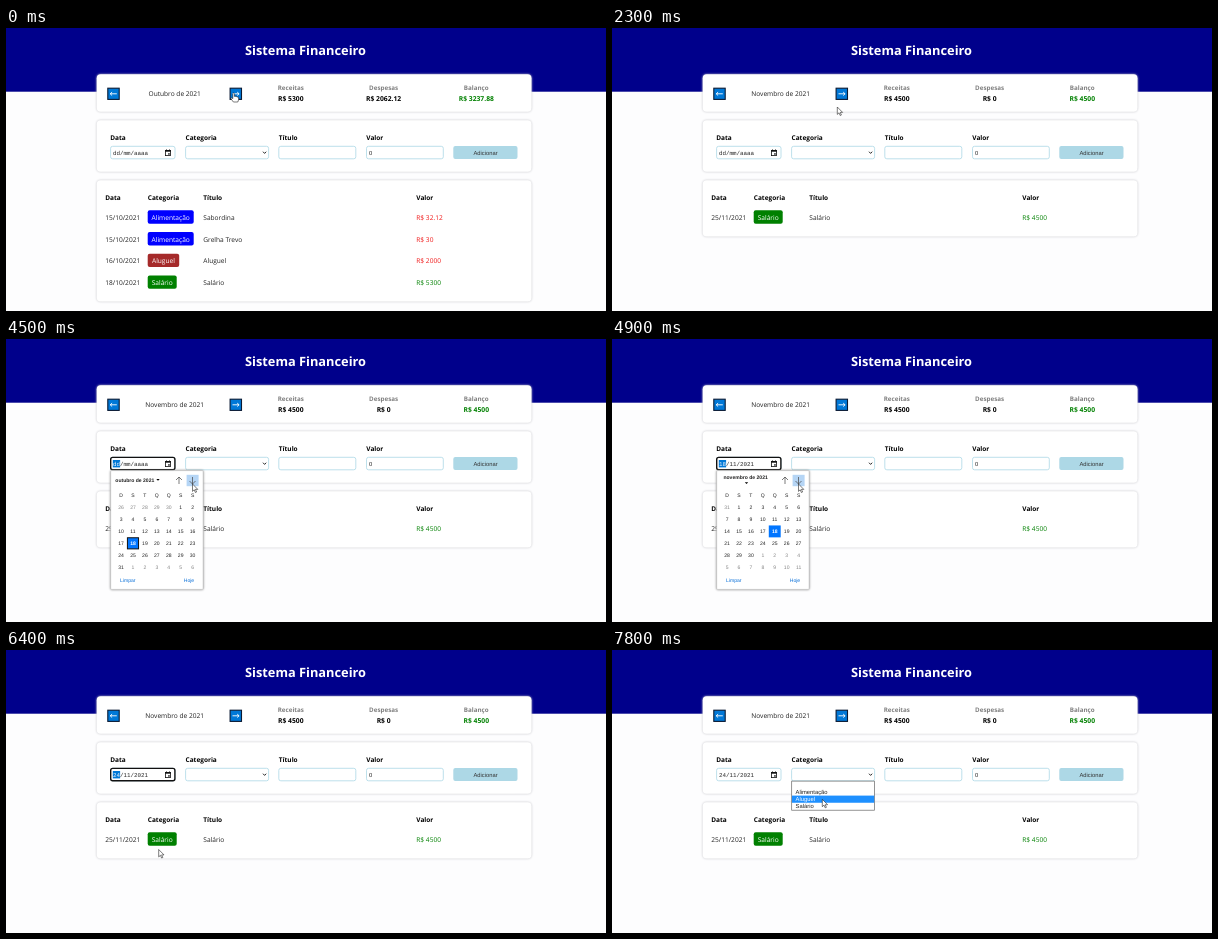
Write an HTML page that moves like this. It is 600 by 283 pixels and loops after 8000 ms.

```html
<!DOCTYPE html>
<html lang="pt-BR">
<head>
<meta charset="utf-8">
<title>Sistema Financeiro</title>
<style>
html, body { margin: 0; width: 100%; height: 100%; overflow: hidden; background: #fdfdfe; }
svg { display: block; width: 100vw; height: 100vh; }
text { font-family: "Open Sans", "Noto Sans", sans-serif; font-size: 6.6px; fill: #222; text-rendering: geometricPrecision; white-space: pre; }
.b { font-weight: 700; font-size: 6.5px; fill: #000; }
.h1 { font-weight: 700; font-size: 12.8px; fill: #fff; }
.label { font-weight: 700; font-size: 6.25px; fill: #808080; }
.sum { font-weight: 700; font-size: 6.75px; fill: #000; }
.ui { font-family: "Liberation Sans", Arial, sans-serif; font-size: 5.8px; }
.mono { font-family: "Liberation Mono", monospace; font-size: 5.85px; }
.cal { font-family: "Liberation Sans", Arial, sans-serif; font-size: 5.05px; }
.m { text-anchor: middle; }
.card { fill: #fff; filter: drop-shadow(0 0 1.1px #c4c4c8); }
.pop { fill: #fff; stroke: #b5b5b5; stroke-width: .5; filter: drop-shadow(.4px .8px 1.2px #888); }
</style>
</head>
<body>
<svg id="stage" viewBox="0 0 600 283" preserveAspectRatio="none"></svg>
<script>
const LOOP = 8000, STEP = 100;
const NEXT_MONTH = 1200, OPEN_CAL = 3000, CAL_NEXT = 4700, PICK_DAY = 6300, OPEN_SELECT = 7100;
const BLUE = '#0078d7', HOVER = '#b5d5f5';

// pointer stops: time, x, y
const PATH = [
  [1800, 227.6, 65], [2100, 227, 70], [2300, 225.3, 79], [2500, 203, 95], [2700, 166, 113.5],
  [2900, 162.8, 122], [3300, 162.8, 122], [3600, 158, 132], [3900, 147, 194], [4100, 155, 190],
  [4500, 186.5, 145], [5000, 186.5, 145], [5400, 179.9, 176.5], [5900, 152.7, 199.5],
  [6400, 152.7, 199.5], [7100, 258, 128], [7300, 258, 128], [7800, 210.3, 149.3]
];

const OCTOBER = {
  title: 'Outubro de 2021', sums: ['5300', '2062.12', '3237.88'],
  rows: [
    ['15/10/2021', 'Alimentação', 'Sabordina', '32.12'],
    ['15/10/2021', 'Alimentação', 'Grelha Trevo', '30'],
    ['16/10/2021', 'Aluguel', 'Aluguel', '2000'],
    ['18/10/2021', 'Salário', 'Salário', '5300']
  ]
};
const NOVEMBER = {
  title: 'Novembro de 2021', sums: ['4500', '0', '4500'],
  rows: [['25/11/2021', 'Salário', 'Salário', '4500']]
};
const TAGS = { 'Alimentação': ['#0000ff', 46], 'Aluguel': ['#a52a2a', 31.5], 'Salário': ['#008000', 29] };

const rect = (x, y, w, h, fill, more = '') =>
  `<rect x="${x}" y="${y}" width="${w}" height="${h}" fill="${fill}" ${more}/>`;
const text = (x, y, s, cls = '', fill = '') =>
  `<text x="${x}" y="${y}" class="${cls}"${fill && ` style="fill:${fill}"`}>${s}</text>`;
const line = (d, color, w) => `<path d="${d}" fill="none" stroke="${color}" stroke-width="${w}"/>`;
const card = (y, h) => `<rect class="card" x="90.7" y="${y}" width="434.8" height="${h}" rx="4"/>`;
const field = (x, w) => rect(x, 118.3, w, 12.5, '#fff', 'rx="2" stroke="#add8e6" stroke-width=".8"');
const inside = (p, x, y, w, h) => p.x >= x && p.x < x + w && p.y >= y && p.y < y + h;

function pointerAt(t) {
  const i = PATH.findIndex(p => p[0] > t);
  if (i === 0) return { x: PATH[0][1], y: PATH[0][2] };
  if (i < 0) return { x: PATH.at(-1)[1], y: PATH.at(-1)[2] };
  const [a, b] = [PATH[i - 1], PATH[i]], k = (t - a[0]) / (b[0] - a[0]);
  return { x: a[1] + (b[1] - a[1]) * k, y: a[2] + (b[2] - a[2]) * k };
}

function monthButton(x, dir) {
  const c = x + 5.7, tip = c + 3.3 * dir, neck = tip - 1.9 * dir;
  return rect(x, 60.2, 11.4, 11.2, BLUE, 'stroke="#0a1a33" stroke-width="1.1"') +
    line(`M${c - 3.3 * dir} 65.8H${tip}M${neck} 64.1L${tip} 65.8L${neck} 67.5`, '#fff', .9);
}

function summary(m) {
  const cols = [['Receitas', 284.8], ['Despesas', 377.6], ['Balanço', 470.3]];
  return card(46.3, 37.4) + monthButton(101.8, -1) + monthButton(224.1, 1) +
    text(168.7, 67.8, m.title, 'm') +
    cols.map(([name, x], i) => text(x, 62.3, name, 'label m') +
      text(x, 73.4, 'R$ ' + m.sums[i], 'sum m', i === 2 ? '#008000' : '')).join('');
}

function form(t) {
  const focus = t >= OPEN_CAL && t < OPEN_SELECT;
  const date = t < CAL_NEXT ? 'dd/mm/aaaa' : t < PICK_DAY ? '18/11/2021' : '24/11/2021';
  let s = card(92.3, 51.4);
  [['Data', 104.3], ['Categoria', 179.5], ['Título', 272.8], ['Valor', 360.3]]
    .forEach(([name, x]) => s += text(x, 112.2, name, 'b'));
  s += field(104.6, 64.4) + field(179.6, 83) + field(272.8, 77) + field(360.5, 76.8);
  if (focus) s += rect(104.7, 118.4, 64.2, 12.3, '#fff', 'rx="2" stroke="#111" stroke-width="1.4"') +
    rect(106.8, 121, 7.3, 7.4, BLUE);
  s += text(107, 126.6, focus ? `<tspan fill="#fff">${date.slice(0, 2)}</tspan>${date.slice(2)}` : date, 'mono');
  s += rect(159.5, 122.4, 5, 5.2, 'none', 'stroke="#111" stroke-width=".8"') +
    rect(159.2, 122, 5.6, 1.7, '#111') + rect(160.2, 121.3, .7, 1, '#111') +
    rect(163.1, 121.3, .7, 1, '#111') + rect(162.2, 125.2, 1.5, 1.5, '#111');
  s += line('M257 123.7L258.6 125.4L260.2 123.7', '#111', .9);
  s += text(363, 126.7, '0', 'ui');
  return s + rect(447.3, 118, 64.2, 13, '#add8e6', 'rx="2"') + text(479.5, 126.6, 'Adicionar', 'ui m', '#333');
}

function list(m) {
  let s = card(152.2, 35 + 21.7 * m.rows.length - .5);
  [['Data', 99.2], ['Categoria', 141.8], ['Título', 197.3], ['Valor', 410.3]]
    .forEach(([name, x]) => s += text(x, 172.4, name, 'b'));
  m.rows.forEach(([date, kind, name, value], i) => {
    const y = 191.8 + 21.7 * i, [color, w] = TAGS[kind];
    s += text(99.2, y, date) + rect(141.7, y - 9.5, w, 13.4, color, 'rx="2"') +
      text(141.7 + w / 2, y, kind, 'm', '#fff') + text(197.3, y, name) +
      text(410.3, y, 'R$ ' + value, '', kind === 'Salário' ? '#008000' : '#f01818');
  });
  return s;
}

function calendar(t, p) {
  const nov = t >= CAL_NEXT, lead = nov ? 1 : 5, prev = nov ? 31 : 30, days = nov ? 30 : 31;
  const W = 11.92, X = 109.1, Y = 162.6;
  let s = '<rect class="pop" x="104.7" y="131.6" width="92.4" height="118.8" rx="1"/>';
  s += nov
    ? text(133.6, 140.3, '<tspan font-weight="700">novembro de 2021</tspan>', 'cal m') + '<path d="M132.8 143.3h3.4l-1.7 1.8z"/>'
    : text(109.3, 142.6, '<tspan font-weight="700">outubro de 2021</tspan>', 'cal') + '<path d="M150.3 139.9h3.4l-1.7 1.8z"/>';
  if (inside(p, 180.6, 135.8, 12, 11.4)) s += rect(180.6, 135.8, 12, 11.4, HOVER);
  s += line('M173 145V138M170 141L173 138L176 141', '#444', .7) +
    line('M186.5 138V145M183.5 142L186.5 145L189.5 142', '#444', .7);
  [...'DSTQQSS'].forEach((d, i) => s += text(X + W * (i + .5), 158.4, d, 'cal m'));
  for (let i = 0; i < 42; i++) {
    const n = i - lead + 1, here = n > 0 && n <= days;
    const x = X + W * (i % 7), y = Y + W * Math.floor(i / 7);
    const chosen = n === 18;
    if (chosen) s += nov ? rect(x, y, W, W, '#0075ff')
      : rect(x + .4, y + .4, W - .8, W - .8, '#0075ff', 'stroke="#111" stroke-width="1"');
    else if (inside(p, x, y, W, W)) s += rect(x, y, W, W, HOVER);
    const label = here ? n : n < 1 ? prev + n : n - days;
    s += text(x + W / 2, y + 7.8, chosen ? `<tspan font-weight="700">${label}</tspan>` : label, 'cal m',
      chosen ? '#fff' : here ? '#222' : '#858585');
  }
  return s + text(114, 243.2, 'Limpar', 'cal', '#0a70d8') + text(177.8, 243.2, 'Hoje', 'cal', '#0a70d8');
}

function dropdown(p) {
  const H = 7.15, hot = Math.max(0, Math.min(3, Math.floor((p.y - 131.3) / H)));
  let s = rect(179.7, 131.1, 82.8, 29.1, '#fff', 'stroke="#666" stroke-width=".7"');
  ['', 'Alimentação', 'Aluguel', 'Salário'].forEach((name, i) => {
    const y = 131.3 + H * i;
    if (i === hot) s += rect(180, y, 82.2, H, '#1e90ff');
    s += text(183.6, y + 5.5, name, 'ui', i === hot ? '#fff' : '');
  });
  return s;
}

function cursor(p) {
  const hand = inside(p, 223.5, 59.5, 12.6, 12.5);
  const d = hand
    ? 'M-.8 .6Q0-.6 .8 .6V3.4Q1.7 2.8 2.4 3.7Q3.3 3.2 3.9 4.1Q5 3.8 5 5V6.8L4.2 9H-.2L-2.7 5.7Q-2.7 4.4-1.5 5L-.8 5.7Z'
    : 'M0 0V7.4L1.7 5.8L2.9 8.5L4.1 8L2.9 5.4H5.3Z';
  return `<path transform="translate(${p.x} ${p.y})" d="${d}" fill="#fff" stroke="#111" stroke-width=".55"/>`;
}

function scene(t) {
  const month = t < NEXT_MONTH ? OCTOBER : NOVEMBER, p = pointerAt(t);
  return rect(0, 0, 600, 283, '#fdfdfe') + rect(0, 0, 600, 63.7, '#00008b') +
    text(299.5, 27.2, 'Sistema Financeiro', 'h1 m') +
    summary(month) + form(t) + list(month) +
    (t >= OPEN_CAL && t < PICK_DAY ? calendar(t, p) : '') +
    (t >= OPEN_SELECT ? dropdown(p) : '') + cursor(p);
}

const stage = document.getElementById('stage'), start = performance.now();
let shown = -1;
function update() {
  const t = Math.floor((performance.now() - start) % LOOP / STEP) * STEP;
  if (t !== shown) stage.innerHTML = scene(shown = t);
  requestAnimationFrame(update);
}
update();
</script>
</body>
</html>
```
